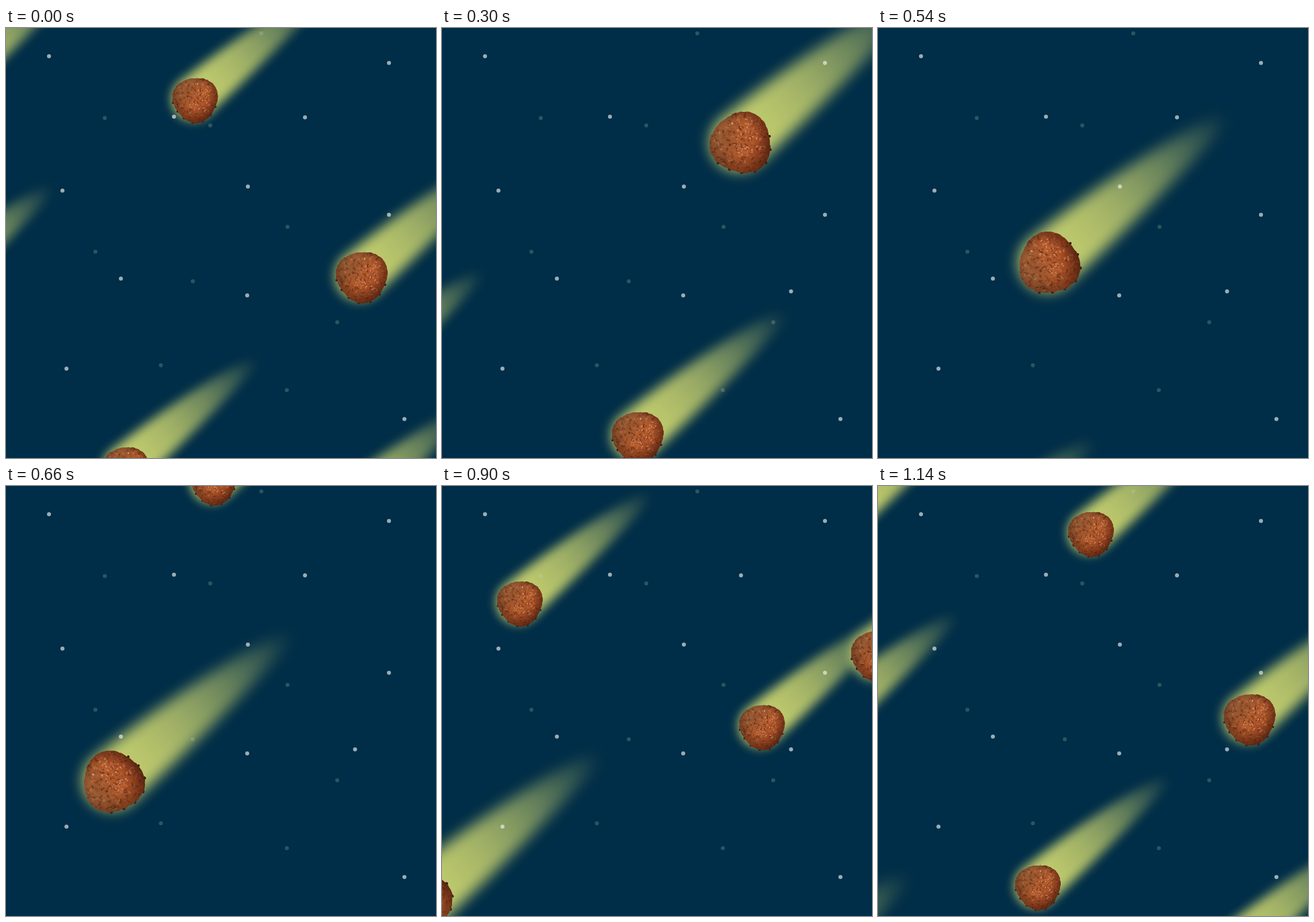
These frames come from a looping animation (640x640 px, 1200 ms). An HTML page with a canvas:

```html
<!DOCTYPE html>
<html lang="en">
<head>
<meta charset="utf-8">
<title>Meteors</title>
<style>
  html, body { margin: 0; width: 100%; height: 100%; overflow: hidden; background: #002d47; }
  canvas { display: block; }
</style>
</head>
<body>
<canvas id="sky" width="640" height="640"></canvas>
<script>
const LOOP = 1200, STEP = 60, RAD = Math.PI / 180;
const TAIL_ANGLE = -40 * RAD, TILT = 17.5;
const ctx = document.getElementById('sky').getContext('2d');

const brightStars = [[64, 42], [570, 52], [250, 132], [445, 133], [84, 242], [360, 236],
  [570, 278], [171, 373], [359, 398], [519.5, 392], [90, 507], [593, 582]];
const dimStars = [[380, 8], [147, 134], [304, 145], [419, 296], [133, 333], [278, 377],
  [493, 438], [230.5, 502], [418, 539]];

// x, y: place at the loop seam; vx, vy: px per ms; boost: speed factor after the seam
const meteors = [
  { size: 0.74, x: 281, y: 107.5, vx: -0.595, vy: 0.6, boost: 2.33 },
  { size: 0.74, x: 178, y: 657, vx: -0.993, vy: 0.993 },
  { size: 0.74, x: -126, y: 400, vx: -0.805, vy: 0.75 },
  { size: 0.74, x: 490, y: 731, vx: -0.7, vy: 0.7 },
  { size: 0.74, x: -86, y: 84, vx: -0.78, vy: 0.8 },
  { size: 0.84, x: 529, y: 371, vx: -0.393, vy: 0.393, boost: 2.02 },
  { size: 1, x: -266, y: 845, vx: -0.79, vy: 0.747, spin: -0.127 }
];

let seed = 11;
function rnd(min = 0, max = 1) {
  seed = (seed * 16807) % 2147483647;
  return min + (max - min) * seed / 2147483647;
}

// A picture drawn at double resolution around its own centre
function sprite(half, draw) {
  const c = document.createElement('canvas');
  c.width = c.height = half * 4;
  const g = c.getContext('2d');
  g.scale(2, 2);
  g.translate(half, half);
  draw(g);
  return { c, half };
}

function stamp({ c, half }, x, y, size, angle) {
  ctx.save();
  ctx.translate(x, y);
  ctx.rotate(angle);
  ctx.scale(size, size);
  ctx.drawImage(c, -half, -half, half * 2, half * 2);
  ctx.restore();
}

function oval(g, x, y, rx, ry, angle, color) {
  g.fillStyle = color;
  g.beginPath();
  g.ellipse(x, y, rx, ry, angle, 0, 7);
  g.fill();
}

const tail = sprite(400, g => {
  const fade = g.createLinearGradient(0, 0, 345, 0);
  for (let p = 0; p <= 1; p += 0.125) {
    fade.addColorStop(p, `rgba(198,208,110,${0.98 * (1 - p ** 1.7)})`);
  }
  g.filter = 'blur(20px)';
  g.fillStyle = fade;
  g.beginPath();
  g.arc(0, -4, 44, Math.PI / 2, -Math.PI / 2);
  g.quadraticCurveTo(190, -44, 345, -9);
  g.lineTo(345, 9);
  g.quadraticCurveTo(170, 32, 0, 40);
  g.fill();
});

const rock = sprite(55, g => {
  const radius = a => 45.2 + 2.3 * Math.cos(3 * a - 195 * RAD) - 1.6 * Math.cos(a - 115 * RAD);
  // Crumbs along the lower rim
  for (let a = 0; a < 170; a += 26) {
    const r = radius(a * RAD);
    oval(g, r * Math.cos(a * RAD), r * Math.sin(a * RAD), 2.4, 2, a, '#43170c');
  }
  g.beginPath();
  for (let a = 0; a < 360; a += 5) {
    const r = radius(a * RAD) + rnd(-0.7, 0.7);
    g.lineTo(r * Math.cos(a * RAD), r * Math.sin(a * RAD));
  }
  g.clip();

  const base = g.createLinearGradient(-44, -20, 44, 24);
  ['#a4683e', '#96562f', '#b05a2c', '#aa5026', '#74331a'].forEach((c, i) => base.addColorStop(i / 4, c));
  g.fillStyle = base;
  g.fillRect(-55, -55, 110, 110);

  // Lumps and pits, then glossy spots on the front face
  const tones = ['70,26,12', '110,48,22', '222,140,92', '200,98,50', '78,32,16'];
  for (let i = 0; i < 520; i++) {
    oval(g, rnd(-48, 48), rnd(-46, 46), rnd(0.8, 4), rnd(0.5, 1.7), rnd(0, 3),
      `rgba(${tones[i % 5]},${rnd(0.15, 0.5)})`);
  }
  for (let i = 0; i < 55; i++) {
    oval(g, rnd(-8, 34), rnd(-36, 16), rnd(0.8, 2.6), rnd(0.5, 1), rnd(0, 3),
      `rgba(246,184,142,${rnd(0.3, 0.75)})`);
  }
  const shade = g.createRadialGradient(-4, -10, 26, -2, -4, 53);
  shade.addColorStop(0, 'rgba(50,16,6,0)');
  shade.addColorStop(1, 'rgba(50,16,6,.6)');
  g.fillStyle = shade;
  g.fillRect(-55, -55, 110, 110);
});

// t counts from the loop seam and may be negative
function pose({ size, x, y, vx, vy, boost = 1, spin }, t) {
  const d = t > 0 ? t * boost : t;
  const turn = spin ? spin * (t + 1020) : TILT;
  return { x: x + vx * d, y: y + vy * d, size, angle: turn * RAD };
}

function drawStars(list, color) {
  for (const [x, y] of list) oval(ctx, x, y, 3, 3, 0, color);
}

function draw(t) {
  ctx.fillStyle = '#002d47';
  ctx.fillRect(0, 0, 640, 640);
  const live = meteors.flatMap(m => [pose(m, t - LOOP), pose(m, t)]);
  live.forEach(m => stamp(tail, m.x, m.y, m.size, TAIL_ANGLE));
  drawStars(dimStars, 'rgba(190,215,190,.23)');
  drawStars(brightStars, 'rgba(235,240,240,.66)');
  live.forEach(m => stamp(rock, m.x, m.y, m.size, m.angle));
}

let start;
function frame(now) {
  start ??= now;
  draw(Math.floor((now - start) % LOOP / STEP) * STEP);
  requestAnimationFrame(frame);
}
draw(0);
requestAnimationFrame(frame);
</script>
</body>
</html>
```
